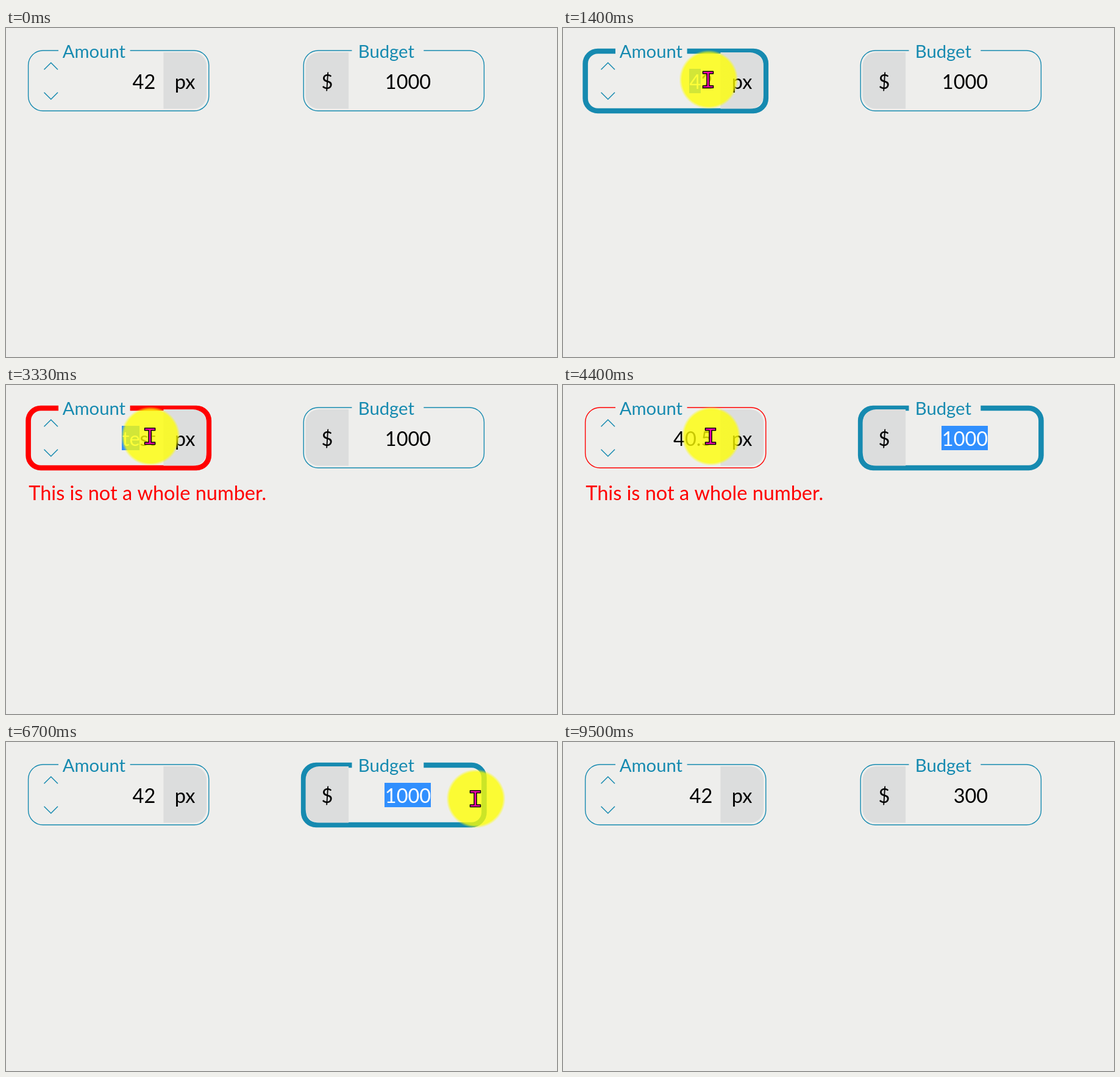
Write an HTML page with a canvas that moves like this. It is 904 px wide and 540 px high and loops after 9860 ms.

```html
<!DOCTYPE html>
<html lang="en">
<head>
<meta charset="utf-8">
<title>Number fields</title>
<style>
html, body { margin: 0; width: 100%; height: 100%; overflow: hidden; background: #eeeeec; }
canvas { display: block; }
</style>
</head>
<body>
<canvas id="stage" width="904" height="540"></canvas>
<script>
const ctx = document.getElementById('stage').getContext('2d');
const LOOP = 9860;
const TEAL = '#168ab0', RED = '#ff0000', PINK = '#ff00b4';
const FONT = 'Lato, "Open Sans", sans-serif';
const SIZE = 32.5;
const ERROR = 'This is not a whole number.';

// Each step changes part of the form; sel counts the leading selected
// characters, null puts the caret at the end.
const steps = [
  [0, { focus: '', amount: '42', amountBad: false, budget: '1000', budgetBad: false, sel: null, caret: true }],
  [700, { amount: '41' }],
  [1060, { amount: '42' }],
  [1270, { focus: 'amount', sel: 0 }],
  [1400, { sel: 1 }],
  [1500, { sel: 2 }],
  ...typing('amount', 'test', [2100, 2160, 2230, 2300]),
  [2400, { focus: 'budget', sel: 4, amountBad: true }],
  [3230, { focus: 'amount', sel: 0 }],
  [3300, { sel: 1 }],
  [3330, { sel: 2 }],
  [3365, { sel: 3 }],
  [3400, { sel: 4 }],
  ...typing('amount', '40.5', [3830, 3930, 4030, 4200]),
  [4400, { focus: 'budget', sel: 4 }],
  [5030, { focus: 'amount', sel: 0 }],
  [5130, { sel: 2 }],
  [5160, { sel: 4 }],
  ...typing('amount', '42', [5600, 5660]),
  [5830, { caret: false }],
  [6030, { focus: 'budget', sel: 4, amountBad: false, caret: true }],
  ...typing('budget', 'test', [6960, 7030, 7090, 7160]),
  [7230, { focus: '', budgetBad: true }],
  [7900, { focus: 'budget', sel: 4 }],
  ...typing('budget', '300', [8060, 8200, 8400]),
  [8760, { focus: '', budgetBad: false }]
];

// Pointer path: time, x, y
const path = [
  [130, 699, 8], [260, 490, 45], [400, 250, 88], [550, 86, 115], [630, 78, 114],
  [830, 78, 114], [960, 74, 69], [1130, 74, 69], [1250, 204, 84], [1300, 206, 84],
  [1600, 304, 86], [3000, 304, 86], [3060, 192, 88], [3200, 192, 86], [3260, 194, 84],
  [3330, 237, 84], [3400, 243, 84], [4900, 243, 84], [4990, 183, 84], [5100, 183, 84],
  [5160, 243, 84], [6530, 243, 84], [6630, 834, 84], [6700, 771, 93], [9360, 771, 93],
  [9500, 803, 570]
];

function typing(field, text, times) {
  return times.map((t, i) => [t, { [field]: text.slice(0, i + 1), sel: null }]);
}

function formAt(t) {
  const form = {};
  for (const [start, change] of steps) if (start <= t) Object.assign(form, change);
  return form;
}

function pointerAt(t) {
  const i = path.findIndex(p => p[0] > t);
  if (i < 1) return null;
  const [t0, x0, y0] = path[i - 1], [t1, x1, y1] = path[i];
  const k = (t - t0) / (t1 - t0);
  return { x: x0 + (x1 - x0) * k, y: y0 + (y1 - y0) * k };
}

function text(str, x, y, color, size = SIZE, align = 'left') {
  ctx.font = `${size}px ${FONT}`;
  ctx.textAlign = align;
  ctx.fillStyle = color;
  ctx.fillText(str, x, y);
}

function frame(x, gapL, gapR, color, thick) {
  const y = thick ? 38 : 37, r = thick ? 20.5 : 24;
  const right = x + 296.2, bottom = 136;
  ctx.beginPath();
  ctx.moveTo(gapR, y);
  ctx.arcTo(right, y, right, bottom, r);
  ctx.arcTo(right, bottom, x, bottom, r);
  ctx.arcTo(x, bottom, x, y, r);
  ctx.arcTo(x, y, gapL, y, r);
  ctx.lineTo(gapL, y);
  ctx.strokeStyle = color;
  ctx.lineWidth = thick ? 8.6 : 1.4;
  ctx.stroke();
}

function unit(x, label, radii) {
  ctx.beginPath();
  ctx.roundRect(x, 40, 70.5, 92.6, radii);
  ctx.fillStyle = '#dcdddd';
  ctx.fill();
  text(label, x + 35.2, 100, '#000', SIZE, 'center');
}

function value(str, right, form, focused) {
  ctx.font = `${SIZE}px ${FONT}`;
  const left = right - ctx.measureText(str).width;
  text(str, left, 100, '#000');
  if (!focused) return;
  if (form.sel) {
    const w = ctx.measureText(str.slice(0, form.sel)).width;
    ctx.save();
    ctx.beginPath();
    ctx.rect(Math.floor(left), 67, Math.ceil(w), 40);
    ctx.clip();
    ctx.fillStyle = '#308ffe';
    ctx.fillRect(left - 1, 67, w + 2, 40);
    text(str, left, 100, '#fff');
    ctx.restore();
  } else if (form.caret) {
    ctx.fillStyle = '#000';
    ctx.fillRect(form.sel === 0 ? left : right - 2.3, 67, 1.4, 40);
  }
}

function chevron(y, dy) {
  ctx.beginPath();
  ctx.moveTo(62.5, y);
  ctx.lineTo(73.8, y + dy);
  ctx.lineTo(85, y);
  ctx.strokeStyle = TEAL;
  ctx.lineWidth = 1.5;
  ctx.stroke();
}

function drawForm(form) {
  const onAmount = form.focus === 'amount', onBudget = form.focus === 'budget';
  frame(36.6, 86, 203.6, form.amountBad ? RED : TEAL, onAmount);
  unit(258.4, 'px', [0, 22, 22, 0]);
  chevron(68.3, -11.3);
  chevron(105.7, 11.3);
  text('Amount', 92.8, 49, TEAL, SIZE * 0.9);
  value(form.amount, 245.3, form, onAmount);
  if (form.amountBad) text(ERROR, 37.3, 189, RED);

  frame(488.2, 567.5, 685.3, form.budgetBad ? RED : TEAL, onBudget);
  unit(491.6, '$', [22, 0, 0, 22]);
  text('Budget', 577.8, 49, TEAL, SIZE * 0.9);
  value(form.budget, 697.2, form, onBudget);
  if (form.budgetBad) text(ERROR, 489, 189, RED);
}

function shape(d) {
  const p = new Path2D(d);
  ctx.fillStyle = PINK;
  ctx.fill(p);
  ctx.strokeStyle = '#000';
  ctx.lineWidth = 1.5;
  ctx.lineJoin = 'round';
  ctx.stroke(p);
}

const shapes = {
  hand: 'M-3 2Q-3 0 -.8 0Q1.3 0 1.3 2V9.5Q5 8.5 5.6 11Q9.3 10 9.8 12.5Q13.6 11.8 13.6 15V22Q13.6 25 11 28V31.5H-2V29L-9 19.5Q-11 16.5 -8.6 15.5Q-6.8 15 -3 19Z' +
    'M1.3 9.5V16M5.6 11V16.5M9.8 12.5V17',
  beam: 'M-9.5 -13.3H7.5V-9.6H1V10H7.5V13.6H-9.5V10H-3V-9.6H-9.5Z',
  arrow: 'M0 0V25L6 19.5L10 29L14.5 27L10.5 18H18.5Z'
};

function shapeFor(x, y) {
  const inside = left => x > left && x < left + 296 && y > 37 && y < 136;
  if (inside(36.6)) return x < 95 ? 'hand' : 'beam';
  return inside(488.2) ? 'beam' : 'arrow';
}

function drawPointer({ x, y }) {
  ctx.save();
  ctx.translate(x, y);
  const glow = ctx.createRadialGradient(0, 0, 0, 0, 0, 48.5);
  glow.addColorStop(0, 'rgba(255,255,0,.78)');
  glow.addColorStop(0.9, 'rgba(255,255,0,.78)');
  glow.addColorStop(1, 'rgba(255,255,0,0)');
  ctx.fillStyle = glow;
  ctx.fillRect(-49, -49, 98, 98);
  shape(shapes[shapeFor(x, y)]);
  ctx.restore();
}

function draw(now) {
  const t = now % LOOP;
  ctx.fillStyle = '#eeeeec';
  ctx.fillRect(0, 0, 904, 540);
  drawForm(formAt(t));
  const pointer = pointerAt(t);
  if (pointer) drawPointer(pointer);
}

const begin = performance.now();
function tick() {
  draw(performance.now() - begin);
  requestAnimationFrame(tick);
}
tick();
</script>
</body>
</html>
```
